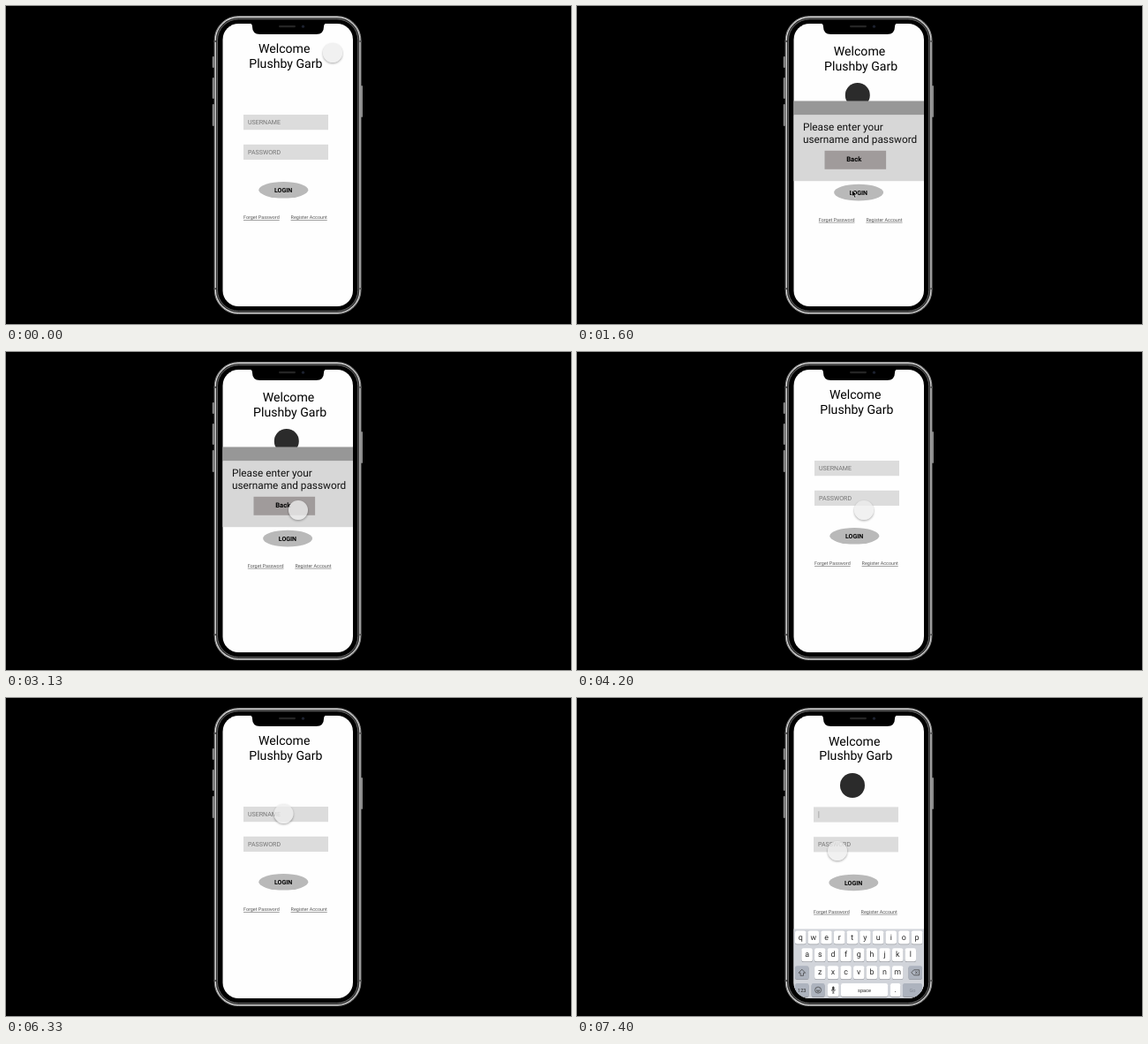
An HTML page for the animation above (8000 ms loop, 640 by 360 pixels).

```html
<!DOCTYPE html>
<html lang="en">
<head>
<meta charset="utf-8">
<title>Login prototype</title>
<style>
html, body { margin: 0; width: 100%; height: 100%; overflow: hidden; background: #000; }
svg { display: block; width: 640px; height: 360px; }
text { font-family: Roboto, sans-serif; text-rendering: geometricPrecision; }
.title { font-size: 14.1px; }
.hint { font-size: 7.05px; fill: #747474; }
.link { font-size: 5.42px; fill: #555; text-decoration: underline; text-decoration-thickness: .4px; }
.note { font-size: 11.8px; fill: #111; }
.bold { font-weight: 700; font-size: 7.05px; }
.key { font-size: 8.9px; fill: #2a2a2a; text-anchor: middle; }
.small { font-size: 5.6px; }
</style>
</head>
<body>
<svg viewBox="0 0 640 360">
  <defs>
    <clipPath id="glass"><rect x="245.5" y="20" width="147.5" height="320" rx="18"/></clipPath>
    <filter id="soft" x="-50%" y="-50%" width="200%" height="200%"><feGaussianBlur stdDeviation="1.1"/></filter>
    <mask id="rim">
      <rect x="-20" y="-20" width="40" height="40" fill="#fff"/>
      <circle r="11" fill="#000"/>
    </mask>
  </defs>

  <g fill="#8d8d8d">
    <rect x="233.8" y="57" width="2" height="13" rx="1"/>
    <rect x="233.8" y="81" width="2" height="24" rx="1"/>
    <rect x="233.8" y="111" width="2" height="25" rx="1"/>
    <rect x="402" y="90" width="2" height="36" rx="1"/>
  </g>
  <rect x="236.2" y="11.6" width="165.800" height="337" rx="27" fill="#2c2c2c" stroke="#828282"/>
  <rect x="237.300" y="12.700" width="163.600" height="334.800" rx="26" fill="none" stroke="#d8d8d8" stroke-width="1.200"/>
  <rect x="239.500" y="14.900" width="159.200" height="330.400" rx="23.800" stroke="#777" stroke-width=".8"/>
  <g fill="#555">
    <rect x="235.6" y="39" width="2.4" height="2"/><rect x="400.4" y="39" width="2.4" height="2"/>
    <rect x="235.6" y="319" width="2.4" height="2"/><rect x="400.4" y="319" width="2.4" height="2"/>
  </g>

  <g clip-path="url(#glass)">
    <rect x="245" y="20" width="149" height="320" fill="#fefefe"/>
    <g id="page"></g>
    <g id="dialog">
      <rect x="245" y="107.5" width="149" height="16" fill="#979797"/>
      <rect x="245" y="123.5" width="149" height="74.7" fill="#d7d7d7"/>
      <text class="note" x="256" y="141.3">Please enter your</text>
      <text class="note" x="256" y="155">username and password</text>
      <rect x="280.5" y="163.8" width="69.6" height="21" fill="#a09b9b"/>
      <text class="bold" x="305.2" y="176.4" style="font-size:7.7px">Back</text>
    </g>
    <g id="keys"></g>
    <path id="arrow" d="M311.4 208.3v7.6l1.8-1.6 1.3 3 1.5-.7-1.3-2.8h2.4z" stroke="#fff" stroke-width=".6"/>
    <g id="touch">
      <circle cy="1.2" r="11.1" fill="#000" fill-opacity=".3" filter="url(#soft)" mask="url(#rim)"/>
      <circle r="11" fill="#eee" fill-opacity=".78"/>
    </g>
  </g>

  <path d="M276 19.5q3 .5 3 4 0 8.5 8.5 8.5h64q8.5 0 8.5-8.5 0-3.5 3-4z"/>
  <rect x="309" y="22" width="19" height="2.2" rx="1.1" fill="#252525"/>
  <circle cx="336.5" cy="23.2" r="1.6" fill="#1d2230"/>
</svg>
<script>
const $ = id => document.getElementById(id);
const STEP = 1000 / 15, LOOP = 8000;
const ERROR = 1600, DISMISS = 4200, TYPING = 6530;

const tag = (name, attrs, body = '') =>
  `<${name} ${Object.entries(attrs).map(([k, v]) => `${k}="${v}"`).join(' ')}>${body}</${name}>`;
const text = (cls, x, y, body) => tag('text', { class: cls, x, y }, body);
const box = (x, y, width, height, fill, rx = 0) => tag('rect', { x, y, width, height, fill, rx });

// dx shifts the whole form; title, fields, button and links shift single rows down
function form({ dx, title, fields, button, links, logo, focused }) {
  const field = (y, hint) => box(269 + dx, y + fields, 96, 17.2, '#dcdcdc') +
    text('hint', 274 + dx, y + 11 + fields, hint);
  return text('title', 286 + dx, 53.3 + title, 'Welcome') +
    text('title', 275.3 + dx, 69.9 + title, 'Plushby Garb') +
    (logo ? tag('circle', { cx: 313 + dx, cy: logo, r: 14, fill: '#2b2b2b' }) : '') +
    field(123, focused ? '' : 'USERNAME') + field(156.8, 'PASSWORD') +
    tag('ellipse', { cx: 314.3 + dx, cy: 208.3 + button, rx: 28, ry: 9.3, fill: '#b9b9b9' }) +
    text('bold', 304 + dx, 210.9 + button, 'LOGIN') +
    text('link', 269 + dx, 241 + links, 'Forget Password') +
    text('link', 322.6 + dx, 241 + links, 'Register Account');
}

const pages = {
  plain: form({ dx: 0, title: 0, fields: 0, button: 0, links: 0 }),
  error: form({ dx: 4.8, title: 2.7, fields: 3, button: 2.8, links: 2.8, logo: 101 }),
  typing: form({ dx: -1, title: .5, fields: .4, button: .7, links: 2.8, logo: 99, focused: true }) +
    tag('rect', { id: 'caret', x: 273.6, y: 128.2, width: .6, height: 7.6, fill: '#888' })
};

function keyboard() {
  const key = (x, y, w, label, fill = '#fff', cls = 'key', ink = '#2a2a2a') =>
    box(x, y + .8, w, 15, '#989ba1', 2.2) + box(x, y, w, 15, fill, 2.2) +
    `<text class="${cls}" x="${x + w / 2}" y="${y + (cls === 'key' ? 10.1 : 9.5)}" style="fill:${ink}">${label}</text>`;
  const row = (letters, x, y) =>
    [...letters].map((c, i) => key(x + i * 14.65 - 6.2, y, 12.4, c)).join('');
  const dark = '#adb3be', small = 'key small';
  const icon = (d, fill = 'none') =>
    tag('path', { d, fill, stroke: '#3a3a3a', 'stroke-width': .7, 'stroke-linejoin': 'round' });
  return box(245, 261.5, 149, 79, '#d1d4da') +
    row('qwertyuiop', 253.2, 263.4) + row('asdfghjkl', 260.6, 283.3) + row('zxcvbnm', 275.3, 303.2) +
    key(247, 303.2, 15.6, '', dark) + key(375.4, 303.2, 15.6, '', dark) +
    key(247, 323.1, 15.6, '123', dark, small) + key(265.6, 323.1, 15, '', dark) +
    key(284, 323.1, 12.6, '') + key(299, 323.1, 53, 'space', '#fff', small) +
    key(355, 323.1, 11.4, '.') + key(369, 323.1, 22, 'Go', dark, small, '#858b95') +
    icon('M254.8 307.2l-3.8 4h2.1v3.1h3.4v-3.1h2.1z') +
    icon('M378.8 310.8l2.8-3h6v6h-6zM383.2 309.5l2.600 2.600m0-2.600l-2.600 2.600') +
    icon('M269.6 330.6a3.5 3.5 0 1 0 7 0a3.5 3.5 0 1 0-7 0M271.3 331.2q1.8 2.8 3.6 0zM271.8 329.2v.4m2.6-.4v.4') +
    icon('M289.5 327.6v2.6a.8.8 0 0 0 1.6 0v-2.6a.8.8 0 0 0-1.6 0z', '#3a3a3a') +
    icon('M288.2 330q.3 2.3 2.1 2.3t2.1-2.3m-2.1 2.3v1.8m-1.2 0h2.4');
}
$('keys').innerHTML = keyboard();

// time, x, y
const path = [
  [0, 370, 53], [170, 354, 88], [340, 344, 130], [500, 352, 172], [667, 367, 204],
  [867, 367, 204], [1333, 313, 211],
  [2200, 312, 211], [2470, 298, 199], [2800, 356, 170], [3067, 337, 178],
  [3133, 331, 179], [3600, 325, 179],
  [4933, 325, 179], [5400, 311, 206], [5533, 310.5, 197], [5800, 317, 149],
  [6333, 314.5, 131],
  [6800, 314.5, 131], [7130, 366, 322], [7400, 295, 173], [LOOP, 295, 173]
];

function pointAt(t) {
  const i = Math.max(1, path.findIndex(p => p[0] >= t));
  const [a, b] = [path[i - 1], path[i]];
  const k = (t - a[0]) / (b[0] - a[0]);
  return [a[1] + (b[1] - a[1]) * k, a[2] + (b[2] - a[2]) * k];
}

const show = (el, on) => el.setAttribute('visibility', on ? 'visible' : 'hidden');
const within = (t, a, b) => t >= a && t < b;
let current;

function draw(now) {
  const t = Math.floor((now % LOOP + 5) / STEP) * STEP;
  const at = t + 5;
  const name = at >= TYPING ? 'typing' : within(at, ERROR, DISMISS) ? 'error' : 'plain';
  if (name !== current) {
    $('page').innerHTML = pages[name];
    current = name;
  }
  show($('dialog'), name === 'error');
  show($('keys'), name === 'typing');
  if (name === 'typing') show($('caret'), !within(at, 6867, 7400));

  // the touch dot hides while a new page waits for the next move
  const [x, y] = pointAt(t);
  const waiting = within(at, ERROR, 2267);
  show($('touch'), !waiting && !within(at, TYPING, 6867));
  show($('arrow'), waiting);
  $('touch').setAttribute('transform', `translate(${x} ${y})`);
  $('touch').setAttribute('opacity', within(at, 5330, 5600) ? .6 : 1);
}

function tick() {
  draw(performance.now());
  requestAnimationFrame(tick);
}
tick();
</script>
</body>
</html>
```
